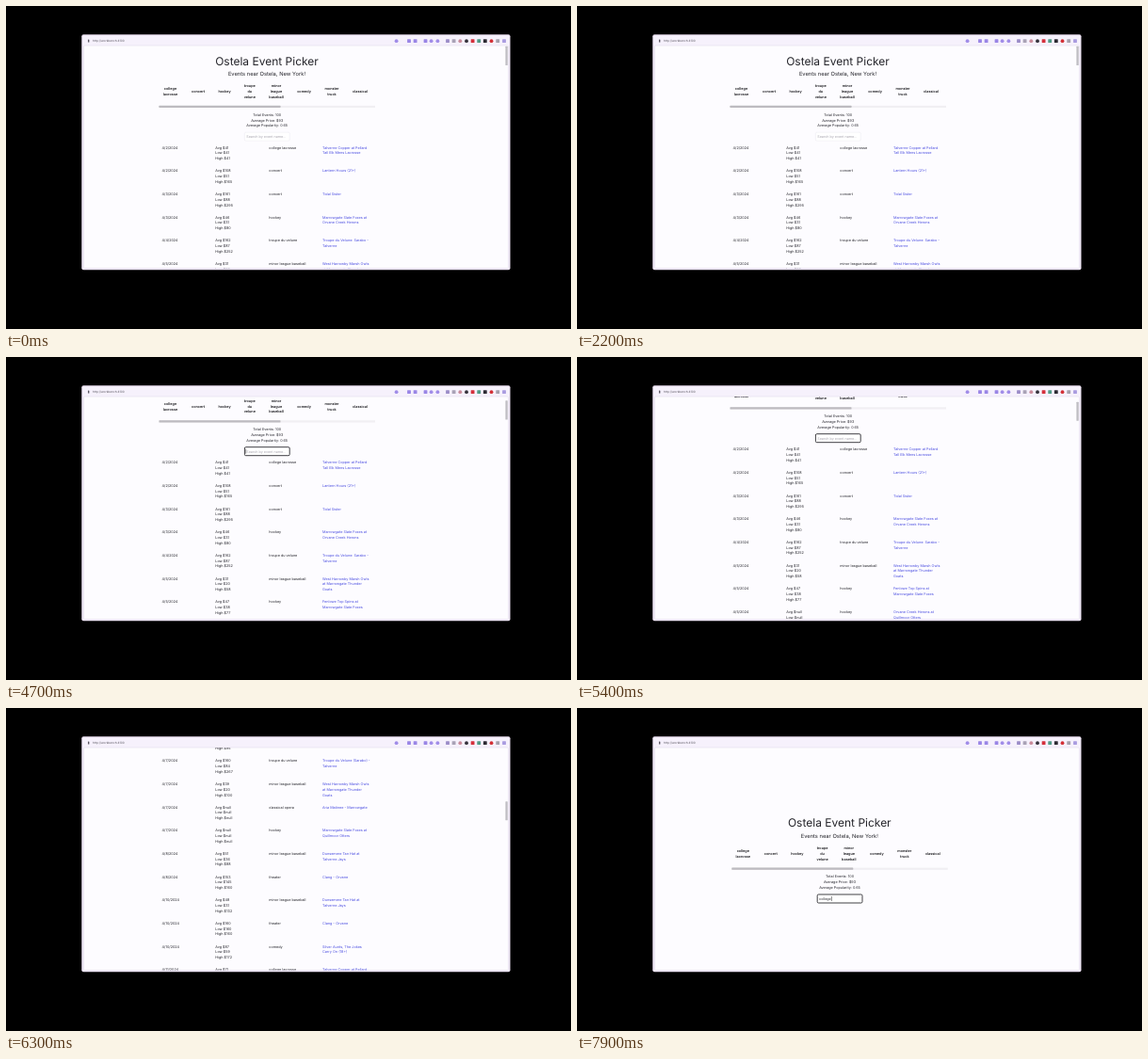
Animation, 600 px wide and 343 px high, one loop 8000 ms. Source, as an HTML page:

```html
<!DOCTYPE html>
<html lang="en">
<head>
<meta charset="utf-8">
<title>Event list</title>
<style>
  html, body { margin: 0; width: 100%; height: 100%; overflow: hidden; background: #000; }
  svg { display: block; width: 100%; height: 100%; }
  text { font: 400 3.78px Inter, "Open Sans", sans-serif; fill: #24242a; text-rendering: geometricPrecision; white-space: pre; }
  .mid { text-anchor: middle; }
  .title { font-size: 12px; }
  .sub { font-size: 5.78px; }
  .head { font-weight: 600; fill: #1a1a1e; }
  .link { fill: #4a4de0; }
  .url { font-size: 3.15px; fill: #55525c; }
  .field { font-size: 3.7px; }
</style>
</head>
<body>
<svg id="stage" viewBox="0 0 600 343">
  <defs>
    <clipPath id="view"><rect x="82.5" y="42" width="451" height="236.6"/></clipPath>
  </defs>
  <rect width="600" height="343"/>
  <rect x="80.3" y="30.3" width="455.2" height="250" rx="2" fill="#e7dcee"/>
  <rect x="81.2" y="31.2" width="453.4" height="248.2" rx="1.5" fill="#f6f1fc"/>
  <rect x="82.5" y="42" width="451" height="236.6" rx="1" fill="#fdfcff" stroke="#ddd5e6" stroke-width=".5"/>
  <g id="bar"></g>
  <g clip-path="url(#view)">
    <g id="page"></g>
    <rect id="thumb" x="530.4" width="2.3" rx=".5" fill="#bfbdc3"/>
  </g>
</svg>
<script>
const NS = "http://www.w3.org/2000/svg";
const LOOP = 8000, STEP = 100;
const ROW_TOP = 151.7, PITCH = 24.66, LINE = 5.8;
const VIEW_TOP = 42, VIEW_H = 237, TOTAL = 100;
const $ = id => document.getElementById(id);

function add(parent, tag, attrs, content) {
  const el = document.createElementNS(NS, tag);
  for (const k in attrs) el.setAttribute(k, attrs[k]);
  if (content !== undefined) el.textContent = content;
  parent.appendChild(el);
  return el;
}
const write = (parent, x, y, content, cls = "") => add(parent, "text", { x, y, class: cls }, content);
const lines = (parent, x, y, list, cls) => list.forEach((s, i) => write(parent, x, y + i * LINE, s, cls));

// Toolbar
const bar = $("bar");
add(bar, "rect", { x: 87, y: 35.6, width: 1.4, height: 3, rx: .4, fill: "#5a5662" });
write(bar, 92, 38.3, "http://workbench:4100", "url");
const square = (x, fill) => add(bar, "rect", { x: x - 1.9, y: 35.3, width: 3.8, height: 3.8, rx: .5, fill });
const circle = (x, fill) => add(bar, "circle", { cx: x, cy: 37.2, r: 1.9, fill });
[428, 434.6, 445.5].forEach(x => square(x, "#9a86e6"));
[414.6, 451.6, 458.4].forEach(x => circle(x, "#a08ce8"));
square(469, "#9b8cc8");
square(475.6, "#a9a2b6");
circle(482.3, "#c98a9a");
circle(489, "#33303a");
square(495.6, "#d5303c");
square(502.2, "#4f9a86");
square(508.8, "#2c2a33");
circle(515.5, "#d32f35");
square(522.2, "#a5a0ad");
square(529, "#a99be0");

// Page head
const page = $("page");
write(page, 277, 62.6, "Ostela Event Picker", "title mid");
write(page, 277, 74.2, "Events near Ostela, New York!", "sub mid");
const heads = [
  [174.5, "college lacrosse"], [204, "concert"], [232, "hockey"], [258.8, "troupe du velune"],
  [287, "minor league baseball"], [316.5, "comedy"], [346, "monster truck"], [376, "classical"]
];
for (const [x, label] of heads) {
  const words = label.split(" ");
  lines(page, x, 92.1 - (words.length - 1) * LINE / 2, words, "head mid");
}
add(page, "rect", { x: 162.5, y: 105.8, width: 229.5, height: 2.2, fill: "#f1eff3" });
add(page, "rect", { x: 162.5, y: 105.8, width: 129, height: 2.2, rx: .5, fill: "#bdbbc0" });

const marks = [[261.3, 33], [259.6, 35], [255, 28]].map(([x, width], i) =>
  add(page, "rect", { x, y: 112.5 + i * LINE, width, height: LINE, fill: "#e6a6ac" }));
lines(page, 277.2, 116.7, ["Total Events: 100", "Average Price: $93", "Average Popularity: 0.65"], "mid");

const box = add(page, "rect", { x: 253.4, y: 134.2, width: 47.8, height: 9, rx: 1.3, fill: "#fff" });
const hint = write(page, 255.3, 140, "Search by event name...", "field");
hint.style.fill = "#a9a6b0";
const typed = write(page, 255.3, 140, "", "field");
const caret = add(page, "rect", { y: 136.2, width: .5, height: 5, fill: "#222" });

// Event rows: day, average, low, high, kind, name
const FOXES = "Marrowgate Slate Foxes", TROUPE = "troupe du velune", BALL = "minor league baseball";
const OWLS = "West Harrowby Marsh Owls|at Marrowgate Thunder|Goats";
const JAYS = "Dunsemere Tan Hat at|Talverne Jays";
const CLANG = "Clang - Orvane";
const first = [
  [2, 41, 41, 41, "college lacrosse", "Talverne Copper at Pellard|Tall Elk Mens Lacrosse"],
  [2, 108, 51, 165, "concert", "Lantern Hours (21+)"],
  [3, 161, 88, 295, "concert", "Tidal Sister"],
  [3, 46, 31, 80, "hockey", FOXES + " at|Orvane Creek Herons"],
  [4, 162, 87, 252, TROUPE, "Troupe du Velune: Sarabo -|Talverne"],
  [5, 31, 20, 58, BALL, OWLS],
  [5, 47, 38, 77, "hockey", "Fenlowe Top Spins at|" + FOXES],
  [5, null, null, null, "hockey", "Orvane Creek Herons at|Quillmoor Otters"]
];
const later = [
  [7, 160, 84, 267, TROUPE, "Troupe du Velune (Sarabo) -|Talverne"],
  [7, 39, 20, 100, BALL, OWLS],
  [7, null, null, null, "classical opera", "Aria Matinee - Marrowgate"],
  [7, null, null, null, "hockey", FOXES + " at|Quillmoor Otters"],
  [8, 51, 36, 88, BALL, JAYS],
  [8, 153, 145, 160, "theater", CLANG],
  [10, 48, 31, 132, BALL, JAYS],
  [10, 160, 160, 160, "theater", CLANG],
  [10, 87, 59, 172, "comedy", "Silver Aunts, The Jokes|Carry On (18+)"]
];
function filler(i) {
  const [, , , , kind, name] = first[(i * 5 + 2) % 8];
  const low = 20 + i * 17 % 43;
  const day = i > 29 ? 11 : i < 10 ? 5 : i < 16 ? 6 : 7;
  return [day, low + 14, low, i === 20 ? 95 : low + 40, kind, name];
}
const rows = Array.from({ length: 34 }, (_, i) => {
  const [day, avg, low, high, kind, name] = first[i] || later[i - 21] || filler(i);
  const g = add(page, "g", {});
  write(g, 165.6, 0, `4/${day}/2024`);
  lines(g, 222.3, 0, [`Avg $${avg}`, `Low $${low}`, `High $${high}`]);
  write(g, 279.3, 0, kind);
  lines(g, 336, 0, name.split("|"), "link");
  return { g, name: name.toLowerCase() };
});

// Time and page offset
const stops = [[4000, 0], [4700, 38.5], [5400, 52.5], [6300, 612.3], [6900, 0]];
function scrollAt(t) {
  for (let i = 1; i < stops.length; i++) {
    const [t0, a] = stops[i - 1], [t1, b] = stops[i];
    if (t >= t0 && t < t1) {
      const p = (t - t0) / (t1 - t0);
      return a + (b - a) * p * p * (3 - 2 * p);
    }
  }
  return 0;
}
const queries = ["c", "co", "coll", "colle", "college"];
const show = (el, on) => el.setAttribute("display", on ? "inline" : "none");

function draw(t) {
  const focus = t >= 4100;
  const query = t < 7500 ? "" : queries[Math.floor((t - 7500) / STEP)];
  const scroll = scrollAt(t);

  let count = 0;
  for (const { g, name } of rows) {
    const hit = name.includes(query);
    show(g, hit);
    if (hit) g.setAttribute("transform", `translate(0 ${ROW_TOP + PITCH * count++})`);
  }

  // Short lists sit in the middle and need no scrollbar.
  const drop = Math.max(0, 63.8 - count * PITCH / 2);
  page.setAttribute("transform", `translate(${drop ? 1.8 : 0} ${drop - scroll})`);
  const full = ROW_TOP - VIEW_TOP + PITCH * (query ? count : TOTAL);
  show($("thumb"), !drop);
  $("thumb").setAttribute("y", VIEW_TOP + .8 + scroll * VIEW_H / full);
  $("thumb").setAttribute("height", Math.min(VIEW_H, VIEW_H * VIEW_H / full) - 1.6);

  const selecting = t >= 3600 && t < 4100;
  marks.forEach(m => show(m, selecting));
  marks[2].setAttribute("width", t < 3700 ? 28 : t < 3900 ? 39 : 20);

  box.setAttribute("stroke", focus ? "#2c2b30" : "#e6e3ea");
  box.setAttribute("stroke-width", focus ? .9 : .4);
  show(hint, !query);
  typed.textContent = query;
  show(caret, focus && (query || Math.floor((t - 4100) / 200) % 2));
  caret.setAttribute("x", query ? 255.5 + typed.getComputedTextLength() : 254.6);
}

function tick() {
  draw(Math.floor(performance.now() % LOOP / STEP) * STEP);
  requestAnimationFrame(tick);
}
tick();
</script>
</body>
</html>
```
